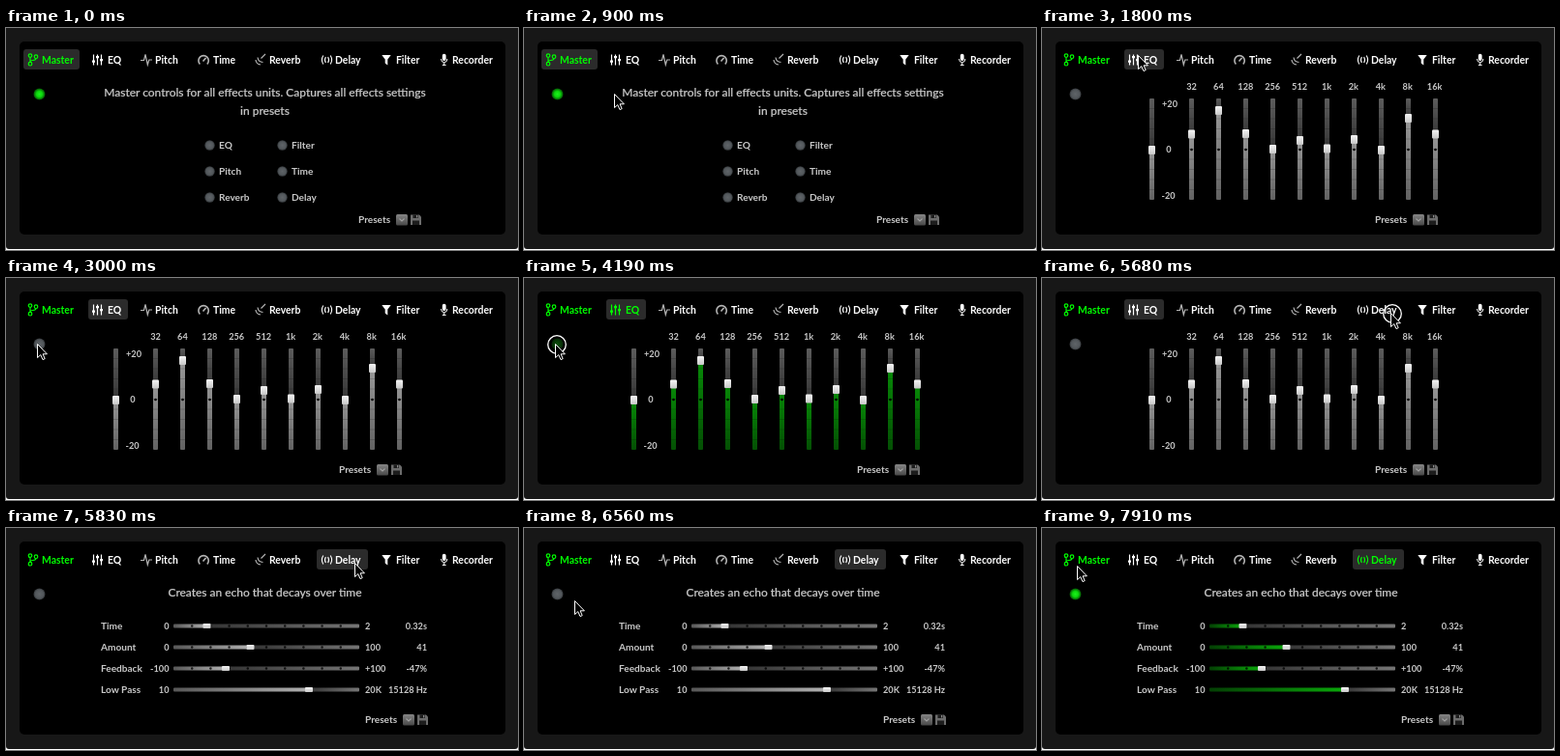
An HTML page that plays this animation: 529 by 230 pixels, repeating every 8000 ms.

```html
<!DOCTYPE html>
<html lang="en">
<head>
<meta charset="utf-8">
<title>Audio effects panel</title>
<style>
  html, body { margin: 0; width: 529px; height: 230px; overflow: hidden; background: #fff; }
  svg { display: block; }
  text { font-family: Lato, "Open Sans", sans-serif; font-weight: 700; font-size: 10.1px; fill: #c8c8c8; }
  .title { font-size: 11.95px; font-weight: 500; fill: #c8c8c8; stroke: #c8c8c8; stroke-width: .2; }
  .num { font-size: 9.2px; }
  .tab { color: #fff; }
  .tab text { font-size: 10.4px; fill: currentColor; }
  .tab.on { color: #0f0; }
  .tab .icon { fill: none; stroke: currentColor; stroke-width: 1.2; }
  .tab .solid { fill: currentColor; stroke: none; }
  .tab .dim { opacity: .7; }
  .tab rect.back { fill: #2b2b2b; visibility: hidden; }
  .tab.open rect.back { visibility: visible; }
  .page { display: none; }
  .page.open { display: inline; }
  .fill.lit { display: none; }
  .live .fill.lit { display: inline; }
  .live .fill.plain { display: none; }
</style>
</head>
<body>
<svg id="stage" width="529" height="230" viewBox="0 0 529 230">
  <defs>
    <radialGradient id="ledOn"><stop offset="0" stop-color="#1cf01c"/><stop offset=".5" stop-color="#0cd80c"/><stop offset="1" stop-color="#045004"/></radialGradient>
    <radialGradient id="ledOff"><stop offset="0" stop-color="#5f6468"/><stop offset=".7" stop-color="#52575b"/><stop offset="1" stop-color="#34383b"/></radialGradient>
    <radialGradient id="ledDown"><stop offset="0" stop-color="#0b520b"/><stop offset="1" stop-color="#062806"/></radialGradient>
    <linearGradient id="thumb" x2="0" y2="1"><stop offset="0" stop-color="#f4f4f4"/><stop offset="1" stop-color="#c8c8c8"/></linearGradient>
    <linearGradient id="button" x2="0" y2="1"><stop offset="0" stop-color="#858585"/><stop offset="1" stop-color="#484848"/></linearGradient>
    <linearGradient id="plainX"><stop offset="0" stop-color="#575757"/><stop offset="1" stop-color="#b0b0b0"/></linearGradient>
    <linearGradient id="litX"><stop offset="0" stop-color="#043f04"/><stop offset="1" stop-color="#0aa80a"/></linearGradient>
    <linearGradient id="restX"><stop offset="0" stop-color="#343434"/><stop offset="1" stop-color="#757575"/></linearGradient>
    <linearGradient id="plainY" x2="0" y2="1"><stop offset="0" stop-color="#979797"/><stop offset="1" stop-color="#626262"/></linearGradient>
    <linearGradient id="litY" x2="0" y2="1"><stop offset="0" stop-color="#078a07"/><stop offset="1" stop-color="#045004"/></linearGradient>
    <linearGradient id="restY" x2="0" y2="1"><stop offset="0" stop-color="#5c5c5c"/><stop offset="1" stop-color="#363636"/></linearGradient>
  </defs>
  <path d="M0 0H529V226Q529 229 526 229H3Q0 229 0 226Z" fill="#171717"/>
  <rect x="14" y="14" width="502" height="200" rx="5"/>
  <g id="tabs"></g>
  <g id="pages"></g>
  <circle id="led" cx="34.5" cy="68.5" r="6"/>
  <g id="pointer">
    <circle id="ring" cx="2" cy="1" r="9.3" fill="none" stroke="#fff" stroke-width="1.3"/>
    <path d="M.5 .5V14.6L3.8 11.6L6 16.6L8.2 15.6L6.1 10.8H10.4Z" fill="#000" stroke="#fff"/>
  </g>
</svg>
<script>
const $ = id => document.getElementById(id);

// name, text x, highlight x, highlight width, icon
const TABS = [
  ["Master", 37, 18, 58, `<path d="M25 30.5V35.5M25 34.8C25 32.6 31 34.6 31 31.5"/>
    <circle cx="25" cy="28.6" r="1.8"/><circle cx="25" cy="37.2" r="1.8"/><circle cx="31" cy="29.7" r="1.8"/>`],
  ["EQ", 105, 85, 41, `<path d="M90.5 27.5V38.5M94.5 27.5V38.5M98.5 27.5V38.5"/>
    <path class="solid" d="M89 33.5h3v2.2h-3zM93 29h3v2.2h-3zM97 32h3v2.2h-3z"/>`],
  ["Pitch", 154, 135, 46, `<path class="dim" d="M139 33.5H142.5L144 27.5L146.3 38L147.8 33H151"/>`],
  ["Time", 214, 194, 47, `<path class="dim" d="M200.4 37.5A5.2 5.2 0 1 1 207.8 37.5M203.5 34.5L206.5 31" stroke-width="1.6"/>`],
  ["Reverb", 272, 253, 56, `<path class="dim" d="M258 33Q258.5 37.5 263 38M260 30.5Q260.5 35 265.5 35.5M263.5 31.5L268 27"/>`],
  ["Delay", 340, 321, 53, `<path d="M327.8 28.5Q325 33 327.8 37.5M330.4 30Q328.6 33 330.4 36M335.2 28.5Q338 33 335.2 37.5M332.6 30Q334.4 33 332.6 36" stroke-width="1.1"/>`],
  ["Filter", 403, 384, 47, `<path class="solid" d="M388.3 28H397.7L394.3 32.4V38.4L391.7 36.6V32.4Z"/>`],
  ["Recorder", 461, 445, 64, `<rect class="solid" x="450.8" y="26.8" width="3.8" height="7.2" rx="1.9"/>
    <path d="M449.5 32Q449.5 35.6 452.7 35.6Q455.9 35.6 455.9 32M452.7 36V38.6M450.8 38.4H454.6" stroke-width="1"/>`]
];

const label = (s, x, y, cls = "", anchor = "start") =>
  `<text x="${x}" y="${y}" class="${cls}" text-anchor="${anchor}">${s}</text>`;
const bar = (x, y, w, h, paint, cls = "") =>
  `<rect x="${x}" y="${y}" width="${w}" height="${h}" rx="1" fill="url(#${paint})" class="${cls}"/>`;
const range = (n, f) => Array.from({ length: n }, (_, i) => f(i)).join("");

function presets(dx) {
  return `<g transform="translate(${dx} 0)">${label("Presets", 364, 202)}
    <rect x="403" y="193" width="12" height="11.5" rx="1.5" fill="url(#button)"/>
    <path d="M406.5 197.5L409 200L411.5 197.5" fill="none" stroke="#a0a0a0" stroke-width="1.2"/>
    <path d="M418 193.5H427L429 195.5V204H418Z" fill="#6c6c6c"/>
    <path d="M420.5 193.5h5.5v3.5h-5.5zM420 199.5h7v4.5h-7z" fill="#1c1c1c"/>
    <path d="M424 194h1.3v2.5h-1.3z" fill="#888"/></g>`;
}

function fader(x, at) {
  const top = 73, end = 178, left = x - 2.5;
  return bar(left, top, 5, at - top, "restY")
    + bar(left, at, 5, end - at, "plainY", "fill plain")
    + bar(left, at, 5, end - at, "litY", "fill lit")
    + range(9, i => `<rect x="${left}" y="${83 + i * 10.5}" width="5" height="1" opacity=".16"/>`)
    + `<circle cx="${x}" cy="126" r="1.3"/>`
    + bar(x - 3.5, at - 4.5, 7, 9, "thumb");
}

function slider([name, min, max, value, at], row) {
  const y = 101.5 + row * 22, base = y + 3.5, left = 173, end = 365;
  return label(name, 98, base) + label(min, 168.5, base, "num", "end")
    + label(max, 371, base, "num") + label(value, 435, base, "num", "end")
    + bar(left, y - 2, at - left, 4, "plainX", "fill plain")
    + bar(left, y - 2, at - left, 4, "litX", "fill lit")
    + bar(at, y - 2, end - at, 4, "restX")
    + (row < 3 ? range(9, i => `<circle cx="${left + 19.2 * (i + 1)}" cy="${y}" r="1.2" opacity=".8"/>`) : "")
    + bar(at - 4, y - 2.5, 8, 5, "thumb");
}

const units = [["EQ", "Filter"], ["Pitch", "Time"], ["Reverb", "Delay"]];
const bands = [["32", 110], ["64", 85.5], ["128", 109.5], ["256", 125.5], ["512", 116.5],
  ["1k", 125], ["2k", 115.5], ["4k", 126.5], ["8k", 93.5], ["16k", 110]];
const delays = [["Time", "0", "2", "0.32s", 207.5], ["Amount", "0", "100", "41", 252.5],
  ["Feedback", "-100", "+100", "-47%", 227], ["Low Pass", "10", "20K", "15128 Hz", 313]];

const PAGES = {
  Master: label("Master controls for all effects units. Captures all effects settings", 267.5, 71, "title", "middle")
    + label("in presets", 267.5, 90, "title", "middle")
    + units.map((pair, r) => pair.map((name, c) =>
        `<circle cx="${210.5 + c * 75}" cy="${121.5 + r * 27}" r="5.2" fill="url(#ledOff)"/>`
        + label(name, 220 + c * 75, 125 + r * 27)).join("")).join("")
    + presets(0),
  EQ: fader(113.5, 126.5)
    + label("+20", 132, 82, "num", "middle") + label("0", 131, 129, "num", "middle") + label("-20", 130.5, 177, "num", "middle")
    + bands.map(([name, at], i) => label(name, 154.5 + i * 27.9, 64, "num", "middle") + fader(154.5 + i * 28, at)).join("")
    + presets(-20),
  Delay: label("Creates an echo that decays over time", 267.5, 71, "title", "middle")
    + delays.map(slider).join("") + presets(7)
};

$("tabs").innerHTML = TABS.map(([name, x, left, width, icon]) =>
  `<g class="tab" id="tab${name}"><rect class="back" x="${left}" y="22" width="${width}" height="21" rx="3"/>
   <g class="icon">${icon}</g>${label(name, x, 37)}</g>`).join("");
$("pages").innerHTML = Object.entries(PAGES).map(([name, body]) =>
  `<g class="page" id="page${name}">${body}</g>`).join("");

// pointer stops: time, x, y
const MOVES = [
  [0, -50, -50], [450, 76, 214], [600, 81, 155], [750, 88, 100], [900, 93, 68], [1050, 96, 46], [1200, 98, 33], [1350, 99, 28],
  [2400, 96, 31], [2550, 80, 42], [2700, 59, 56], [2850, 41, 65], [3000, 32, 68],
  [4640, 38, 68], [4790, 82, 66], [4940, 175, 59], [5090, 280, 48], [5240, 348, 39], [5390, 369, 36], [5530, 360, 36],
  [6130, 338, 41], [6280, 245, 58], [6430, 125, 72], [6560, 52, 75], [6710, 38, 71], [6860, 32, 68],
  [7760, 34, 52], [7910, 36, 39]
];
// time, open page, unit on, pointer pressed
const STATES = [
  [0, "Master", 1, 0], [1650, "Master", 1, 1], [1800, "EQ", 0, 0],
  [3140, "EQ", 0, 1], [3290, "EQ", 1, 0], [4190, "EQ", 1, 1], [4340, "EQ", 0, 0],
  [5680, "EQ", 0, 1], [5830, "Delay", 0, 0], [7010, "Delay", 0, 1], [7160, "Delay", 1, 0]
];
const LOOP = 8000;
const last = (table, t) => table.findLast(row => row[0] <= t);

function draw(t) {
  const [, x, y] = last(MOVES, t);
  const [, page, on, pressed] = last(STATES, t);
  for (const [name] of TABS) {
    const tab = $("tab" + name).classList;
    tab.toggle("open", name === page);
    tab.toggle("on", name === "Master" || (name === page && !!on));
  }
  for (const name in PAGES) {
    const group = $("page" + name).classList;
    group.toggle("open", name === page);
    group.toggle("live", !!on);
  }
  const ledDown = pressed && x < 50;
  $("led").setAttribute("fill", `url(#${ledDown ? "ledDown" : on ? "ledOn" : "ledOff"})`);
  $("pointer").setAttribute("transform", `translate(${x} ${y})`);
  $("ring").setAttribute("visibility", pressed ? "visible" : "hidden");
}

const start = performance.now();
function tick() {
  draw((performance.now() - start) % LOOP);
  requestAnimationFrame(tick);
}
tick();
</script>
</body>
</html>
```
